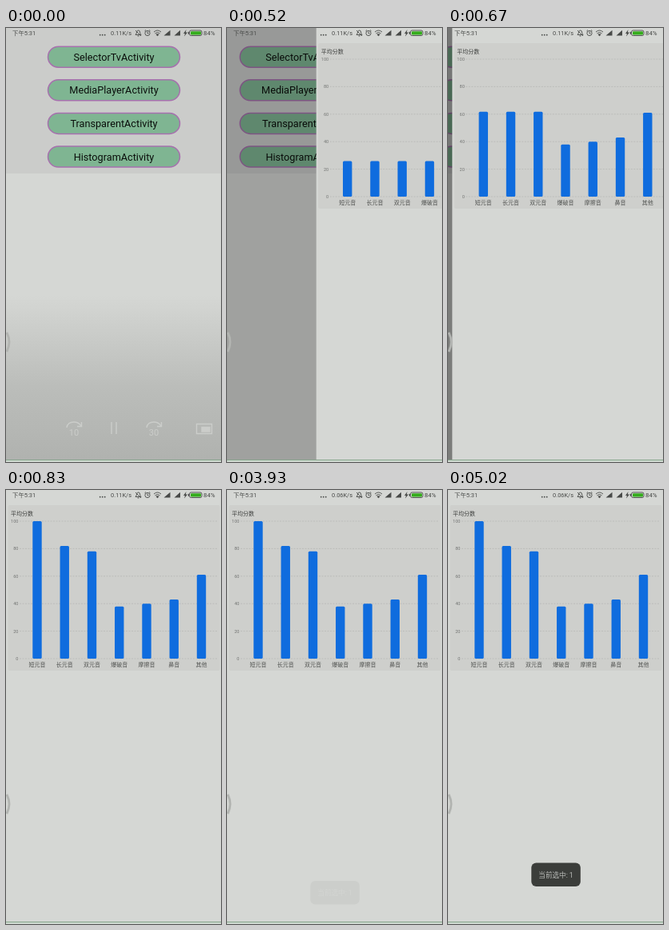
An HTML page for the animation above (5080 ms loop, 269 by 543 pixels).

```html
<!DOCTYPE html>
<html lang="zh-CN">
<head>
<meta charset="utf-8">
<style>
html, body { margin: 0; height: 100%; overflow: hidden; background: #d5d7d4; }
svg { display: block; width: 100%; height: 100%; }
text { font-family: Roboto, "Noto Sans CJK SC", "Noto Sans CJK", sans-serif; }
.mid { text-anchor: middle; }
.end { text-anchor: end; }
.line { fill: none; stroke: #484a48; stroke-width: .9; }
</style>
</head>
<body>
<svg viewBox="0 0 269 543" preserveAspectRatio="none">
  <defs>
    <linearGradient id="shade" x1="0" y1="0" x2="0" y2="1">
      <stop offset="0" stop-color="#d5d7d4"/>
      <stop offset=".55" stop-color="#bbbdba"/>
      <stop offset="1" stop-color="#b0b2af"/>
    </linearGradient>
  </defs>

  <g id="menu">
    <rect width="269" height="543" fill="#d5d7d4"/>
    <rect width="269" height="182" fill="#cbccca"/>
    <g id="buttons" fill="#7fb592" stroke="#a770ae" stroke-width="1.5"></g>
  </g>

  <g id="player">
    <rect y="335" width="269" height="206" fill="url(#shade)"/>
    <g fill="none" stroke="#cbcdca" stroke-width="1.4">
      <path id="skip" d="M76 500Q77 493 85 493Q91 493 94 498M94.500 493V498.500H89"/>
      <path d="M76 500Q77 493 85 493Q91 493 94 498M94.500 493V498.500H89" transform="translate(100)"/>
      <path d="M132 493V508M138 493V508"/>
      <path d="M238.500 495.500H257.500V507.500H238.500Z"/>
      <path d="M245 499.500H255V505H245Z" fill="#cbcdca"/>
    </g>
    <g class="mid" fill="#cbcdca" font-size="11">
      <text x="85" y="510">10</text><text x="185" y="510">30</text>
    </g>
  </g>

  <rect id="dim" width="269" height="543" opacity="0"/>

  <g id="page">
    <rect width="269" height="543" fill="#d5d7d4"/>
    <rect x="2.500" y="19" width="265" height="207" rx="2" fill="#cecfcc"/>
    <text x="6" y="32" font-size="7" font-weight="500" fill="#3c3e3c">平均分数</text>
    <g id="grid" class="end" font-size="5.600" fill="#747674" stroke-width=".8"></g>
    <g id="bars" fill="#0f6cde"></g>
    <g id="labels" class="mid" font-size="7" fill="#505250"></g>
  </g>

  <g fill="#484a48" font-size="7.400">
    <text x="8" y="9.300">下午5:31</text>
    <circle cx="117.700" cy="8.700" r=".9"/><circle cx="120.700" cy="8.700" r=".9"/><circle cx="123.700" cy="8.700" r=".9"/>
    <text id="speed" class="end" x="157" y="9.300"></text>
    <path class="line" d="M162 8.500Q163.500 7 163.500 5Q164 3 165.500 3Q167.500 3 167.500 5Q167.500 7 169 8.500ZM164.500 10H166.500M162 3L169 10"/>
    <circle class="line" cx="177" cy="6.500" r="3.100"/>
    <path class="line" d="M177 4.500V6.800H178.500M173.500 3.800L175 2.500M180.500 3.800L179 2.500"/>
    <path class="line" d="M185 5Q189.500 1 194 5M186.500 6.800Q189.500 4.200 192.500 6.800"/>
    <path d="M187.500 8Q189.500 6.500 191.500 8L189.500 10.300Z"/>
    <path d="M197.500 9.500L205.500 2.700V9.500ZM210.500 9.500L218 2.700V9.500Z"/>
    <path d="M225.500 2L222 6.900H224L223 10.500L227 5.500H224.800Z"/>
    <rect class="line" x="229.500" y="3" width="15.500" height="6.500" rx="2"/>
    <rect x="227.800" y="4.800" width="1.200" height="3" rx=".5"/>
    <rect x="231" y="4.200" width="13" height="4.200" rx="1" fill="#35ad1c"/>
    <text x="247" y="9.300" font-size="7.900">84%</text>
  </g>

  <path d="M1 381Q7 393 1 405" fill="none" stroke="#b2b4b1" stroke-width="2.800"/>
  <rect y="540" width="269" height="1" fill="#86a68c"/>
  <rect y="541" width="269" height="2" fill="#cfd9d0"/>

  <g id="toast">
    <rect x="104.300" y="466.500" width="61.500" height="29.500" rx="6" fill="#3b3d3a"/>
    <text class="mid" x="135" y="484.500" font-size="8.600" fill="#b9bbb8">当前选中: 1</text>
  </g>
</svg>
<script>
const LOOP = 5080, WIDTH = 269, BASE = 211, UNIT = 1.72;
// The screen refreshes only at these moments (ms).
const TICKS = [0, 70, 150, 220, 290, 360, 440, 520, 600, 670, 750, 830, 3930];
// time, vertical offset, opacity
const TOAST = [[0, 0, 0], [3930, 22.5, .05], [4390, 10, .5], [4480, 3, .85], [4630, -2, 1], [4710, 0, 1]];
const DATA = [['短元音', 100], ['长元音', 82], ['双元音', 78], ['爆破音', 38], ['摩擦音', 40], ['鼻音', 43], ['其他', 61]];

const $ = id => document.getElementById(id);
const clamp = v => Math.min(1, Math.max(0, v));

function add(parent, tag, attrs, text = '') {
  const el = document.createElementNS('http://www.w3.org/2000/svg', tag);
  for (const name in attrs) el.setAttribute(name, attrs[name]);
  el.textContent = text;
  return parent.appendChild(el);
}

['SelectorTv', 'MediaPlayer', 'Transparent', 'Histogram'].forEach((name, i) => {
  const y = 36.2 + i * 41.6;
  add($('buttons'), 'rect', { x: 52.5, y: y - 13, width: 165, height: 26, rx: 13 });
  add($('buttons'), 'text', { class: 'mid', x: 135, y: y + 4.6, 'font-size': 12.7, fill: '#0b0f0c', stroke: 'none' }, name + 'Activity');
});

for (let v = 0; v <= 100; v += 20) {
  const y = BASE - v * UNIT;
  add($('grid'), 'path', { d: `M17 ${y}H265`, stroke: '#b6b8b5', 'stroke-dasharray': '2 1.5' });
  add($('grid'), 'text', { x: 15.5, y: y + 2 }, v);
}

const bars = DATA.map(([name, value], i) => {
  const x = 39 + i * 34.25;
  add($('labels'), 'text', { x, y: 221 }, name);
  return { value, el: add($('bars'), 'rect', { x: x - 5.7, width: 11.4, rx: 1.5 }) };
});

function draw(time) {
  const t = TICKS.findLast(tick => tick <= time);
  const away = (1 - clamp((t - 440) / 315)) ** 3;
  const grown = Math.max(0, 45 + (t - 600) * .24);

  $('player').setAttribute('opacity', clamp(1 - t / 360));
  $('menu').setAttribute('transform', `translate(${-62 * (1 - away)})`);
  $('dim').setAttribute('opacity', .43 * (1 - away));
  $('page').setAttribute('transform', `translate(${WIDTH * away})`);
  for (const { value, el } of bars) {
    const h = Math.min(value, grown) * UNIT;
    el.setAttribute('y', BASE - h);
    el.setAttribute('height', h);
  }
  $('speed').textContent = t < 3930 ? '0.11K/s' : '0.06K/s';

  const [, dy, alpha] = TOAST.findLast(key => key[0] <= time);
  $('toast').setAttribute('transform', `translate(0 ${dy})`);
  $('toast').setAttribute('opacity', alpha);
}

const start = performance.now();
function frame() {
  draw((performance.now() - start) % LOOP);
  requestAnimationFrame(frame);
}
frame();
</script>
</body>
</html>
```
